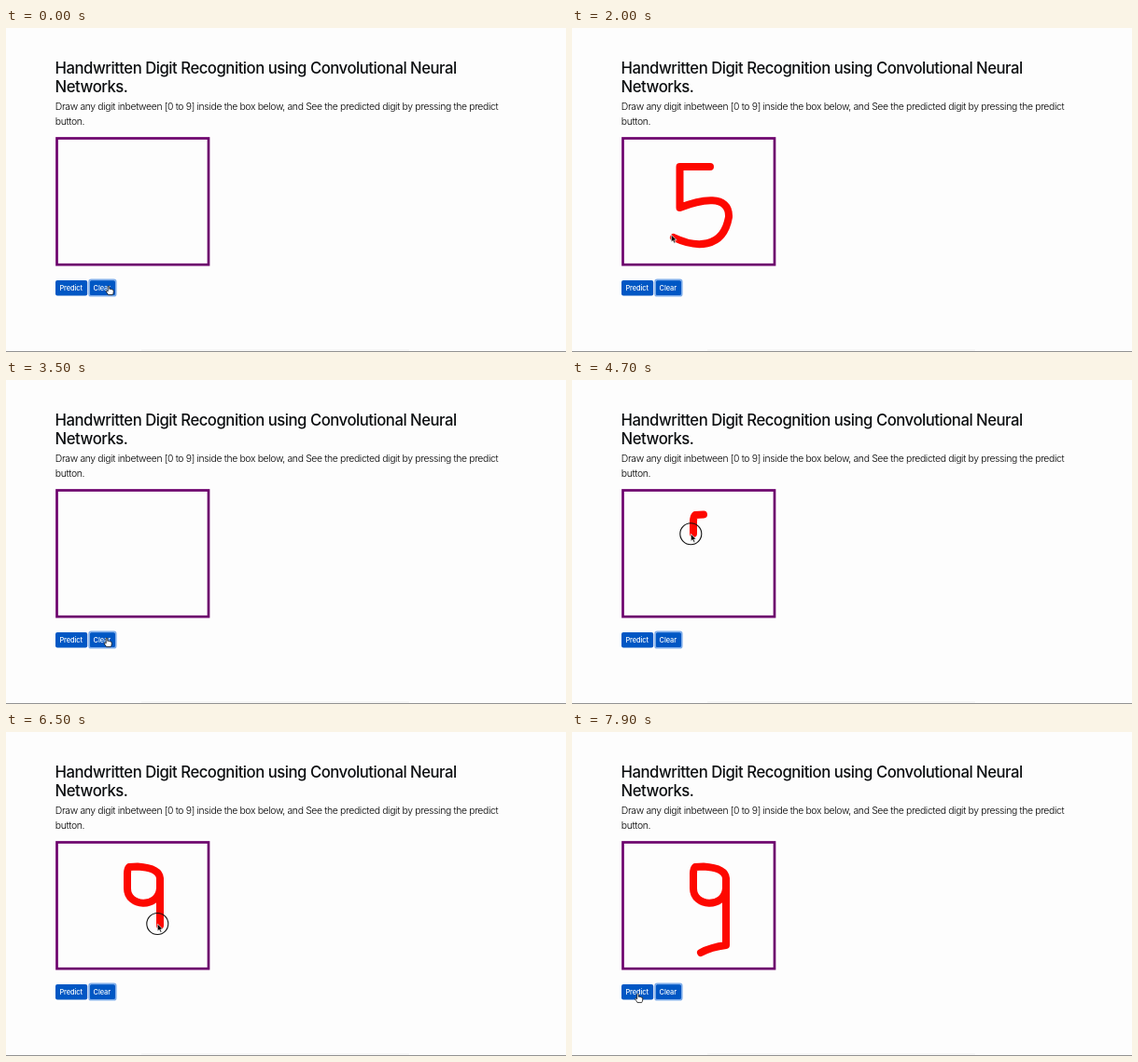
These frames come from a looping animation (600 by 348 pixels, 8000 ms). An HTML page:

```html
<!DOCTYPE html>
<html lang="en">
<head>
<meta charset="utf-8">
<title>Handwritten Digit Recognition</title>
<style>
html, body { margin: 0; width: 100%; height: 100%; overflow: hidden; background: #fdfdfd; }
svg { display: block; width: 600px; height: 348px; font-family: Inter, "Open Sans", sans-serif; }
.title { font-size: 16.7px; font-weight: 500; letter-spacing: -.475px; fill: #0c0e10; }
.lead { font-size: 10.4px; font-weight: 300; letter-spacing: -.343px; fill: #000; }
.label { font-size: 7.4px; font-weight: 500; letter-spacing: -.08px; fill: #fff; }
.btn { fill: #0057c4; }
.ring { fill: none; stroke: #7fadea; stroke-width: 1.6; }
.ink { fill: none; stroke: #fd0800; stroke-width: 8; stroke-linecap: round; stroke-linejoin: round; }
</style>
</head>
<body>
<svg viewBox="0 0 600 348">
  <rect width="600" height="348" fill="#fdfdfd"/>
  <rect x="145" y="345" width="287" height="2" fill="#f7f7f7"/>
  <rect y="347" width="600" height="1" fill="#929292"/>
  <text class="title" x="52.6" y="48.5">Handwritten Digit Recognition using Convolutional Neural</text>
  <text class="title" x="52.6" y="68.5">Networks.</text>
  <text class="lead" x="52.8" y="88.4">Draw any digit inbetween [0 to 9] inside the box below, and See the predicted digit by pressing the predict</text>
  <text class="lead" x="52.8" y="104.4">button.</text>
  <rect x="54.5" y="118.5" width="162.5" height="135.7" fill="#fdfdfd" stroke="#6d006d" stroke-width="2.7"/>
  <rect class="btn" x="53" y="271" width="34.2" height="16.4" rx="2"/>
  <rect class="btn" x="89.4" y="271" width="28" height="16.4" rx="2"/>
  <rect class="ring" id="ringPredict" x="52.6" y="270.4" width="35" height="17.4" rx="2.4"/>
  <rect class="ring" id="ringClear" x="89" y="270.4" width="28.8" height="17.4" rx="2.4"/>
  <text class="label" x="57.4" y="282">Predict</text>
  <text class="label" x="93.6" y="282">Clear</text>
  <path class="ink" id="five" d="M148 149H115.5V193C138 184 169 178 168 203C162 238 132 236 109 225"/>
  <path class="ink" id="nine" d="M141 144.5L132 145Q130 147 130 152V168C130 188 163 190 165 168V157Q164 146 141 144.5Q164 146 165 157V229Q149 231 138 237"/>
  <circle id="press" r="11.5" fill="none" stroke="#111" stroke-width="1.1"/>
  <path id="arrow" d="M0 0V8L1.9 6.3L3.2 9.2L4.6 8.6L3.4 5.8H5.9Z" fill="#000" stroke="#fff" stroke-width=".7"/>
  <path id="hand" d="M-.8 .6Q0-.6.8.6V3.4Q1.8 2.8 2.4 3.7Q3.4 3.2 3.9 4.1Q5.2 3.9 5.2 5.2V7Q5 8.4 4.2 9.6H-.5Q-1.6 7.5-3 5.8Q-2.6 4.4-.8 5.8Z" fill="#fff" stroke="#111" stroke-width=".8" stroke-linejoin="round"/>
</svg>
<script>
const LOOP = 8000, STEP = 100, LAG = 25;
const $ = id => document.getElementById(id);
const show = (el, on) => el.style.display = on ? "" : "none";
const clamp = u => Math.min(1, Math.max(0, u));
const smooth = u => u * u * (3 - 2 * u);

function stroke(id, from, to, release, cleared, ease) {
  const path = $(id), len = path.getTotalLength();
  const reach = t => len * ease(clamp((t - from) / (to - from)));
  return {
    pressed: t => t >= from && t < release,
    // The pointer tip sits up and left of the pen
    tip(t) {
      const p = path.getPointAtLength(reach(t));
      return [p.x - 2.7, p.y - 3];
    },
    draw(t) {
      show(path, t >= from && t < cleared);
      path.style.strokeDasharray = `${Math.max(.1, reach(t - LAG))} ${2 * len}`;
    }
  };
}

const five = stroke("five", 900, 1900, 1950, 3400, u => 1 - (1 - u) ** 2);
const nine = stroke("nine", 4500, 7100, 7200, LOOP, u => u ** .8);
const strokes = [five, nine];

const clear = [110, 277], predict = [70.5, 281];
const moves = [
  { from: 100, to: 850, a: clear, b: five.tip(0) },
  { from: 2100, to: 2700, a: five.tip(LOOP), b: predict },
  { from: 3100, to: 3300, a: predict, b: [108, 277] },
  { from: 3600, to: 4450, a: [108, 277], b: nine.tip(0) },
  { from: 7500, to: 7900, a: nine.tip(LOOP), b: predict }
];

function pointer(t) {
  const busy = strokes.find(s => s.pressed(t));
  if (busy) return busy.tip(t);
  // Rest at the latest goal, or wait where the next move begins
  const { from, to, a, b } = moves.findLast(m => t >= m.from) || moves[0];
  const k = smooth(clamp((t - from) / (to - from)));
  const rested = strokes.findLast(s => k === 1 && s.pressed(t - 300));
  return rested ? rested.tip(t) : a.map((v, i) => v + (b[i] - v) * k);
}

function render(t) {
  const [x, y] = pointer(t), overButton = y > 271;
  const pressed = strokes.some(s => s.pressed(t));
  const place = (id, on) => {
    show($(id), on);
    $(id).setAttribute("transform", `translate(${x} ${y})`);
  };
  strokes.forEach(s => s.draw(t));
  place("press", pressed);
  place("arrow", !overButton);
  place("hand", overButton);

  const predictFocus = t >= 2900 && t < 3400;
  show($("ringPredict"), predictFocus);
  show($("ringClear"), !predictFocus);
}

const start = performance.now();
function tick() {
  const t = (performance.now() - start) % LOOP;
  render(Math.floor(t / STEP) * STEP);
  requestAnimationFrame(tick);
}
tick();
</script>
</body>
</html>
```
